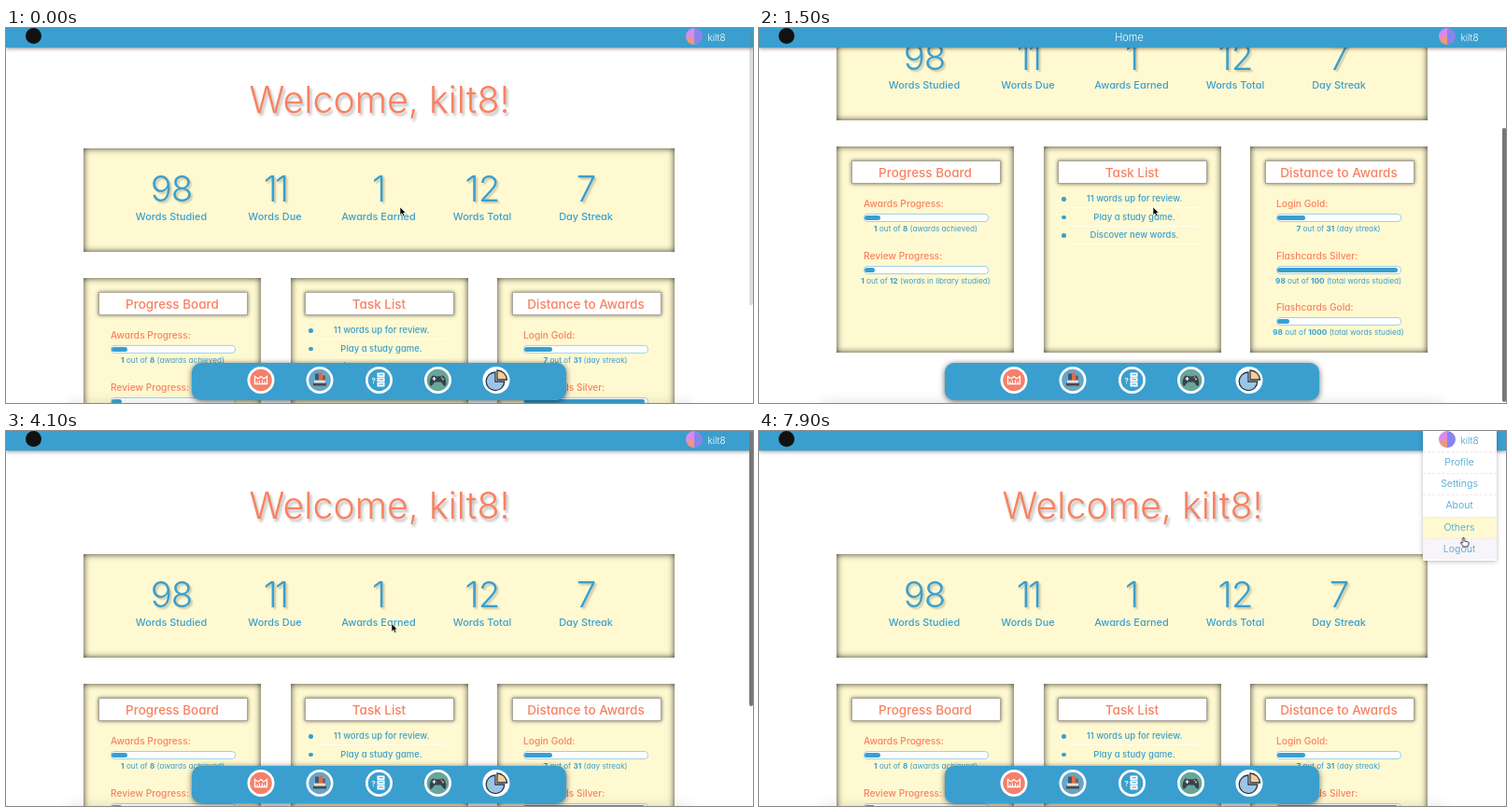
Write an HTML page that moves like this. It is 800x402 px and loops after 8000 ms.

```html
<!DOCTYPE html>
<html lang="en">
<head>
<meta charset="utf-8">
<title>Study dashboard</title>
<style>
@property --s { syntax: "<number>"; inherits: true; initial-value: 0; }
:root { --blue: #3a9fce; --coral: #f98160; --cream: #fff9d1; --loop: 8s linear infinite; }
html, body { margin: 0; width: 100%; height: 100%; overflow: hidden; background: #fff; }
body { font-family: Inter, "Open Sans", sans-serif; font-feature-settings: "cv11"; color: var(--blue); }
#stage { position: absolute; left: 0; top: 0; width: 800px; height: 402px; overflow: hidden; animation: scroll var(--loop); }
#stage div, #stage svg { position: absolute; box-sizing: border-box; }
#page { left: 0; top: 0; width: 800px; height: 546px; transform: translateY(calc(var(--s) * -1px)); }

#stage .t { width: 400px; margin: -10px 0 0 -200px; line-height: 20px; text-align: center; white-space: nowrap; }
#stage .left { margin-left: 0; text-align: left; }
.title { font-size: 39.3px; font-weight: 350; color: var(--coral); text-shadow: 2px 3px 3px #0004; }
.num { font-size: 38.5px; font-weight: 350; text-shadow: 2px 2px 2px #0003; }
.label { font-size: 10.9px; font-weight: 550; }
.head { font-size: 13.5px; font-weight: 550; color: var(--coral); }
.sub { font-size: 10.2px; font-weight: 550; color: var(--coral); }
.note { font-size: 8.2px; }
.note b { font-weight: 700; }
.task { font-size: 9.5px; font-weight: 450; }
.nav { font-size: 11px; font-weight: 350; color: #fff; }
.user { font-size: 10px; font-weight: 350; }
.item { font-size: 10.6px; font-weight: 350; }

.panel { background: var(--cream); box-shadow: inset 0 0 7px #000c; }
.plate { background: #fff; border: 1px solid #aaa59a; box-shadow: 0 0 4px #0009; }
.bar { background: #fff; border: 1px solid #a3d0e5; border-radius: 4px; }
.fill { background: var(--blue); border-radius: 3px; }
.rule { background: #fffc; }
.dot { background: var(--blue); border-radius: 50%; }

#header { left: 0; top: 0; width: 800px; height: 20.5px; background: var(--blue); box-shadow: 0 1px 4px #0007; }
#home { animation: home var(--loop); }
#glow { left: 70px; top: 410px; width: 660px; height: 20px; box-shadow: 0 0 18px 4px #0003; }
#dock { left: 199px; top: 359px; width: 401px; height: 39.5px; border-radius: 10px; background: var(--blue); box-shadow: 0 1px 6px #0009; }
#thumb { left: 795.5px; top: 1px; width: 4px; height: 294px; border-radius: 2px; background: #777; transform: translateY(calc(var(--s) * .736px)); animation: thumb var(--loop); }
#menu { left: 711px; top: 0; width: 78.5px; height: 138.5px; background: #fff; box-shadow: 0 1px 5px #0004; animation: menu var(--loop); }
#menu .row { left: 0; width: 78.5px; height: 23.4px; border-top: 1px dashed #efe6ea; animation: lit var(--loop); }
#avatar { left: 728px; top: -.5px; width: 18px; height: 18px; border-radius: 50%; background: conic-gradient(#8a84ee 0 50%, #f0977c 0 70%, #d98be8 0); }
#logo { left: 21px; top: 0; width: 17px; height: 17px; border-radius: 50%; background: #111; }
#cursor { left: 0; top: 0; width: 14px; height: 16px; overflow: visible; animation: move var(--loop); }
#arrow { animation: arrow var(--loop); }
#hand { animation: hand var(--loop); }

@keyframes scroll {
  0% { --s: 3; }
  11.25% { --s: 89; }
  17.5% { --s: 141; }
  18.75%, 42.5% { --s: 144; }
  43.75% { --s: 127; }
  45% { --s: 85; }
  46.25% { --s: 45; }
  47.5% { --s: 20; }
  48.75% { --s: 7; }
  51.25%, 100% { --s: 0; }
}
@keyframes home {
  0%, 4% { opacity: 0; }
  7.5%, 45% { opacity: 1; }
  48%, 100% { opacity: 0; }
}
@keyframes thumb {
  0% { opacity: .25; }
  2%, 25% { opacity: 1; }
  28.5%, 41.5% { opacity: 0; }
  42.5%, 58.5% { opacity: 1; }
  62.5%, 100% { opacity: 0; }
}
@keyframes menu {
  0%, 68.5% { opacity: 0; }
  71.5%, 100% { opacity: 1; }
}
@keyframes lit {
  0%, 73.125% { background: #fff0; }
  73.75% { background: #f7f5f9; }
  75%, 80% { background: #fff9d1; }
  82.5%, 100% { background: #fff0; }
}
@keyframes move {
  0%, 37% { transform: translate(422px, 192px); animation-timing-function: ease-in-out; }
  41%, 56% { transform: translate(413px, 206.5px); animation-timing-function: ease-in-out; }
  66%, 70% { transform: translate(755.5px, 11px); }
  73.125% { transform: translate(755px, 22px); }
  98.125%, 100% { transform: translate(754.5px, 114px); }
}
@keyframes arrow {
  0%, 69% { opacity: 1; }
  69.01%, 100% { opacity: 0; }
}
@keyframes hand {
  0%, 69% { opacity: 0; }
  69.01%, 100% { opacity: 1; }
}
</style>
</head>
<body>
<div id="stage">
  <div id="page"></div>
  <div id="glow"></div>
  <div id="dock"></div>
  <svg id="icons" style="left:0;top:0" width="800" height="402" viewBox="0 0 800 402">
    <g id="discs" fill="#fff"></g>
    <g transform="translate(273 377.5)">
      <circle r="11.8" fill="#f6806a"/>
      <path d="M-6.500 4V-4L-3-1.500L0-4L3-1.500L6.500-4V4z" fill="none" stroke="#fff" stroke-width="1.300"/>
      <path d="M-4 4V1M-1.500 4V0M1.500 4V0M4 4V1" stroke="#fff"/>
    </g>
    <g transform="translate(336 377.5)">
      <circle r="11.8" fill="#64a6cb"/>
      <path d="M-7 3H7V6H-7z" fill="#58463f"/>
      <path d="M-6 0H6V3H-6z" fill="#e2e1dc"/>
      <path d="M-5-7H-1V0H-5z" fill="#46566b"/>
      <path d="M-1-8H3V0H-1z" fill="#d96f4c"/>
      <path d="M3-5H6V0H3z" fill="#835c4e"/>
    </g>
    <g transform="translate(399.5 377.5)">
      <circle r="11.8" fill="#3a9fce"/>
      <path d="M-2-8H6v4.500H-2zM-2-3H6V1.500H-2zM-2 2H6V7H-2z" fill="#fff"/>
      <path d="M0-5.700H4.500M0-.700H4.500M0 4.500H4.500" stroke="#3a9fce"/>
      <text x="-8" y="3" font-size="8" font-weight="600" fill="#fff">?</text>
    </g>
    <g transform="translate(462.5 377.5)">
      <circle r="11.8" fill="#68a59b"/>
      <path d="M-5-5Q0-3 5-5C8-5 10 4 8 6C6 7 4 2 3 2H-3C-4 2-6 7-8 6C-10 4-8-5-5-5z" fill="#33424e"/>
      <path d="M-6-1.500h4M-4-3.500v4" stroke="#fff" stroke-width="1.200"/>
      <circle cx="4" cy="-3" r="1" fill="#f6806a"/>
      <circle cx="5.5" cy="-1" r="1" fill="#f4cb76"/>
    </g>
    <g transform="translate(525 377.5)" stroke="#263747" stroke-width="1.3">
      <path d="M-1-8.500A9.800 9.800 0 1 0 8.800 1.500H-1z" fill="#9bc5e5"/>
      <path d="M1-10.500A10.500 10.500 0 0 1 11.500-.500H1z" fill="#f8cb91"/>
    </g>
  </svg>
  <div id="header"></div>
  <div id="logo"></div>
  <div id="home" class="t nav" style="left:396.5px;top:10px">Home</div>
  <div class="t nav user" style="left:761px;top:10px">kilt8</div>
  <div id="menu"></div>
  <div id="avatar"></div>
  <div id="thumb"></div>
  <svg id="cursor" viewBox="0 0 14 16">
    <path id="arrow" d="M0 0V8.600L2 6.800L3.500 10L5 9.300L3.600 6.200H6.300z" fill="#000" stroke="#fff" stroke-width=".6"/>
    <path id="hand" d="M-1 1Q0-.500 1 1V4L5 5Q6 5 5.500 7L4.500 10H0L-3 6Q-3 4.500-1 6z" fill="#fff" stroke="#222" stroke-width=".9"/>
  </svg>
</div>
<script>
const $ = id => document.getElementById(id);
const page = $("page"), menu = $("menu");

function add(parent, cls, css, html = "") {
  const el = document.createElement("div");
  el.className = cls;
  el.style.cssText = css;
  el.innerHTML = html;
  parent.append(el);
  return el;
}
const box = (cls, x, y, w, h) =>
  add(page, cls, `left:${x}px;top:${y}px;width:${w}px;height:${h}px`);
const text = (cls, x, y, html, parent = page) =>
  add(parent, "t " + cls, `left:${x}px;top:${y}px`, html);

function card(x, title) {
  box("panel", x, 270.5, 190, 221.5);
  box("plate", x + 15.5, 286, 160, 24.5);
  text("head", x + 95, 298.5, title);
}

function progress(x, row, title, done, total, what) {
  const y = 332.3 + row * 55.5;
  text("sub left", x, y, title);
  box("bar", x - .5, y + 11, 134.5, 9);
  box("fill", x + 1.2, y + 13, Math.max(11, 131 * done / total), 5);
  text("note", x + 66.5, y + 27, `<b>${done}</b> out of <b>${total}</b> (${what})`);
}

text("title", 400, 80, "Welcome, kilt8!");
box("panel", 83, 132, 633, 110.5);
[[98, "Words Studied"], [11, "Words Due"], [1, "Awards Earned"], [12, "Words Total"], [7, "Day Streak"]]
  .forEach(([n, label], i) => {
    const x = 177 + i * 111;
    const num = text("num", x, 174.5, n);
    num.style.letterSpacing = n === 11 ? "-3px" : "-1px";
    text("label", x, 205, label);
  });

card(83, "Progress Board");
progress(112, 0, "Awards Progress:", 1, 8, "awards achieved");
progress(112, 1, "Review Progress:", 1, 12, "words in library studied");

card(304.5, "Task List");
["11 words up for review.", "Play a study game.", "Discover new words."].forEach((task, i) => {
  const y = 327.3 + i * 19.5;
  box("dot", 324, y - 2, 4.5, 4.5);
  text("task", 402, y, task);
  box("rule", 334, y + 9, 136, 1);
});

card(526, "Distance to Awards");
progress(554, 0, "Login Gold:", 7, 31, "day streak");
progress(554, 1, "Flashcards Silver:", 98, 100, "total words studied");
progress(554, 2, "Flashcards Gold:", 98, 1000, "total words studied");

text("user", 50, 10, "kilt8", menu);
["Profile", "Settings", "About", "Others", "Logout"].forEach((name, i) => {
  const y = 21.5 + i * 23.35;
  add(menu, "row", `top:${y}px;animation-delay:${i * .5}s`);
  text("item", 39, y + 12, name, menu);
});

$("discs").innerHTML = [273, 336, 399.5, 462.5, 525]
  .map(x => `<circle cx="${x}" cy="377.5" r="14.5"/>`).join("");
</script>
</body>
</html>
```
